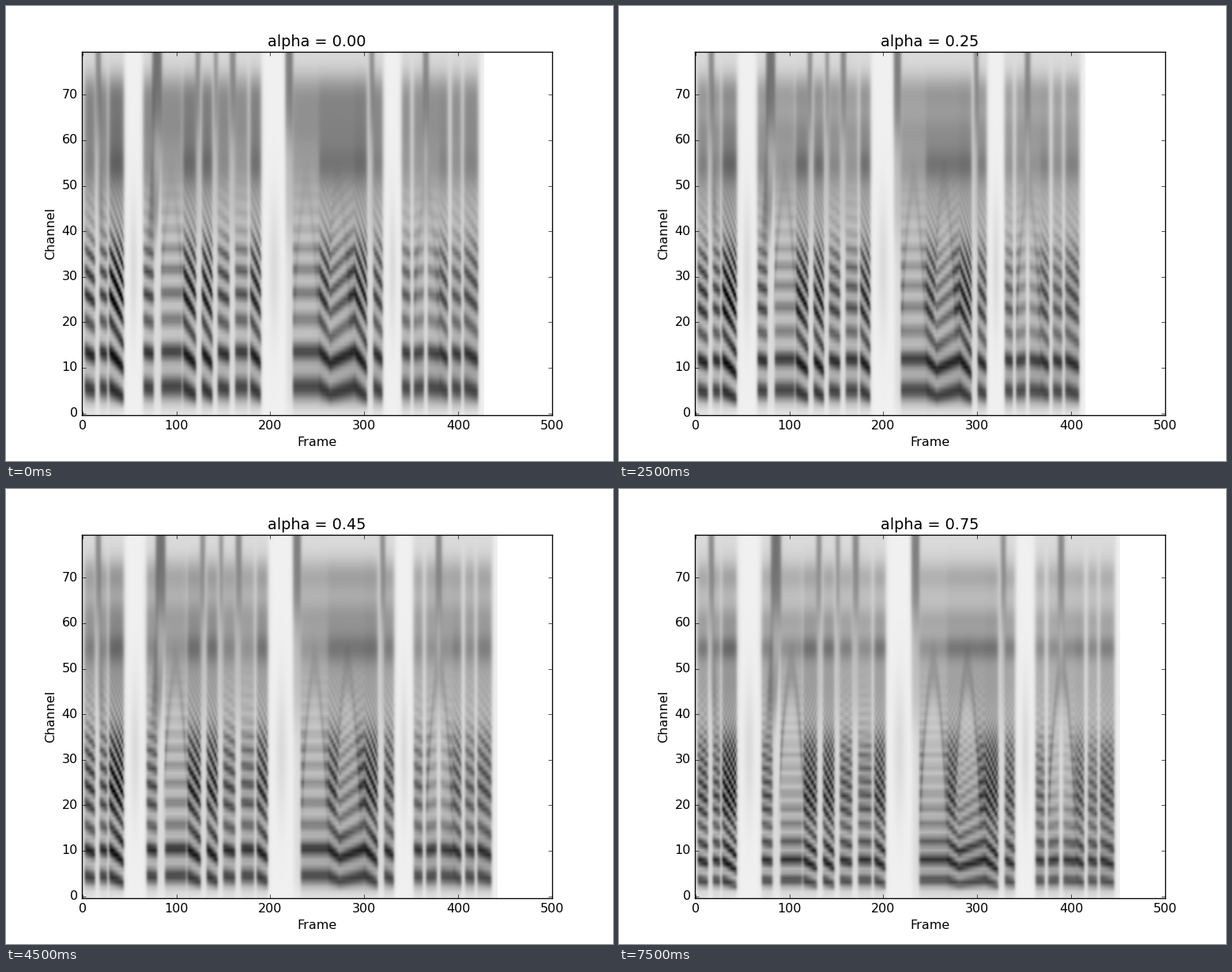
Animation of 768 by 576 pixels, one loop 8 s. Source, as a matplotlib script:

```python
import numpy as np
import matplotlib.pyplot as plt
from matplotlib.animation import FuncAnimation

plt.style.use("classic")
plt.rcParams.update({"font.family": "DejaVu Sans", "figure.facecolor": "white"})

STEPS, CHANNELS, LENGTH = 16, 80, 428
ch = np.arange(CHANNELS)[:, None]

# Syllables: start, end, pitch fall (negative for a rise)
SYLLABLES = [
    (2.5, 13.5, .10), (18.5, 26.5, .06), (28.5, 44, .27), (65, 76, .05),
    (84, 106, 0), (107, 121, .22), (127, 138.5, .22), (144, 156.5, .08),
    (162.5, 176, .02), (178.5, 190, .20), (224, 252, 0), (252, 264, .19),
    (264, 289.5, -.19), (289.5, 303, .27), (309.5, 319.5, .15),
    (340, 349, .05), (352.5, 363.5, -.04), (367.5, 380, .05),
    (380, 389, .14), (393, 403, .08), (406, 421, .15),
]
# Fricatives: centre, half width, slant
HISSES = [(17, 2.8, -.15), (79.5, 5, .22), (123, 2.5, 0), (142, 2, 0),
          (160, 3, 0), (220, 4, 0), (308, 2.5, 0), (365.5, 3, 0)]
GAPS = [(45, 64), (191, 217), (321, 339)]
ARCHES = [95, 238, 272, 366]


def sig(x):
    return 1 / (1 + np.exp(-np.clip(x, -40, 40)))


def bump(x, mid, width):
    return np.exp(-.5 * ((x - mid) / width) ** 2)


def band(x, lo, hi, soft_lo, soft_hi=None):
    return sig((x - lo) / soft_lo) * sig((hi - x) / (soft_hi or soft_lo))


def over(a, b):
    """Stack two layers of ink."""
    return 1 - (1 - a) * (1 - np.clip(b, 0, 1))


def ramp(t, lo, hi):
    return np.clip((t - lo) / (hi - lo), 0, 1)


def speech_time(alpha):
    """Map displayed columns back to the unstretched utterance."""
    t = np.arange(LENGTH + 1.)
    drift = np.interp(alpha, [0, .05, .1, .25, .45, .75],
                      [0, -2, -11, -13, 14, 24])
    breath = 6.5 * alpha
    pause = 40 * bump(alpha, .672, .025)
    warped = (t + breath * ramp(t, *GAPS[0])
              + (drift - breath) * ramp(t, 45, 380) ** 1.15
              + pause * ramp(t, *GAPS[2]))
    return np.interp(np.arange(round(warped[-1])), warped, t)[None, :]


def spectrogram(alpha):
    k = alpha / .75
    t = speech_time(alpha)

    # Background and pauses
    speech = 1 - sum(band(t, a, b, 1.2) for a, b in GAPS)
    speech = speech * sig((423 - t) / 1.2)
    ink = .06 + .08 * speech * sig((ch - 1) / 1.5)
    for a, b in GAPS:
        ink = over(ink, .09 * bump(t, (a + b) / 2, (b - a) / 6) * bump(ch, 32, 11))

    # Spectral envelopes
    edge = 38 - 3 * k
    low = band(ch, 1.2, 17, .8, 3)
    mid = band(ch, 17, edge, 3, 1.8)
    up = band(ch, edge, 53, 1.8, 4)
    colour = (1 + .18 * bump(ch, 12.5 - 4 * k, 2) + .15 * bump(ch, 26 - 5 * k, 4)
              - .2 * bump(ch, 18 - 3 * k, 2.5))
    presence = ((.5 - .25 * k) * bump(ch, 70, 3.5 - 1.5 * k)
                + (.55 - .25 * k) * bump(ch, 62.5 - 2 * k, 4 - 2 * k)
                + .3 * band(ch, 42, 74, 3, 1.5))
    ring = .65 * bump(ch, 54.5, 3.5 - 1.5 * k)
    partial = (np.exp((ch + 4 - 3.2 * alpha) / 44.5) - 1) / (.25 - .17 * alpha)
    clarity = sig((47 - 3 * k - ch) / 4) * (1 - .25 * k * sig((ch - 16) / 4))

    # Formant arches thin out what lies beneath them
    thin, ridges = 1, 0
    for centre in ARCHES:
        crest = 49 - 25 * ((t - centre) / 12) ** 2
        inside = band(t, centre - 12, centre + 12, 1)
        thin = thin * (1 - (.25 + .3 * k) * inside
                       * band(ch, 17, crest, 2.5, 2.5))
        ridges = ridges + (.06 + .1 * k) * inside * bump(ch, crest, 3.5)

    # Voiced sound: harmonics below, formant bands above
    harmonic = formant = 0
    for a, b, fall in SYLLABLES:
        loud = (.58 + 1.3 * abs(fall)) * (1 - a / 1800)
        s = ramp(t, a, b)
        pitch = .98 - abs(fall) * (s if fall >= 0 else 1 - s)
        wave = (.5 + .5 * np.cos(2 * np.pi * partial / pitch)) ** 1.3
        depth = (.8 - a / 2500) * clarity
        level = ((.5 + .35 * loud) * low + loud * mid + .33 * loud * up) * colour
        harmonic = harmonic + (level * (1 - depth * (1 - wave))
                               * band(t, a, b, .7))
        weight = min(1, .45 + 2.5 * abs(fall) + .3 * k)
        formant = formant + ((.2 + .32 * loud) * (presence + weight * ring)
                             * band(t, a, b, 1.1))
    for layer in (harmonic * thin, formant, ridges):
        ink = over(ink, layer)

    for centre, half, slant in HISSES:
        x = centre - slant * np.clip(60 - ch, 0, 30)
        tone = (.65 * sig((ch - 62) / 3) + .3 * sig((ch - 39) / 3)
                + abs(slant) * 1.5 * bump(ch, 45, 6))
        ink = over(ink, (.26 + .05 * half) * tone
                   * band(t, x - half, x + half, .9))
    return np.clip(ink, 0, 1)


fig, ax = plt.subplots(figsize=(8, 6), dpi=96)
image = ax.imshow(np.zeros((CHANNELS, LENGTH)), cmap="gray_r", vmin=0, vmax=1,
                  origin="lower", aspect="auto", interpolation="bilinear")
ax.set_xlim(-.5, 500)
ax.set_ylim(-.5, CHANNELS - .5)
ax.set_xticks(range(0, 501, 100))
ax.set_yticks(range(0, 71, 10))
ax.set_xlabel("Frame")
ax.set_ylabel("Channel")
title = ax.set_title("alpha = 0.00")


def update(i):
    alpha = i * .05
    data = spectrogram(alpha)
    image.set_data(data)
    image.set_extent((-.5, data.shape[1] - .5, -.5, CHANNELS - .5))
    title.set_text(f"alpha = {alpha:.2f}")
    return image, title


anim = FuncAnimation(fig, update, frames=STEPS, init_func=lambda: update(0),
                     interval=500, repeat=True, repeat_delay=0, blit=False)
plt.show()
```
